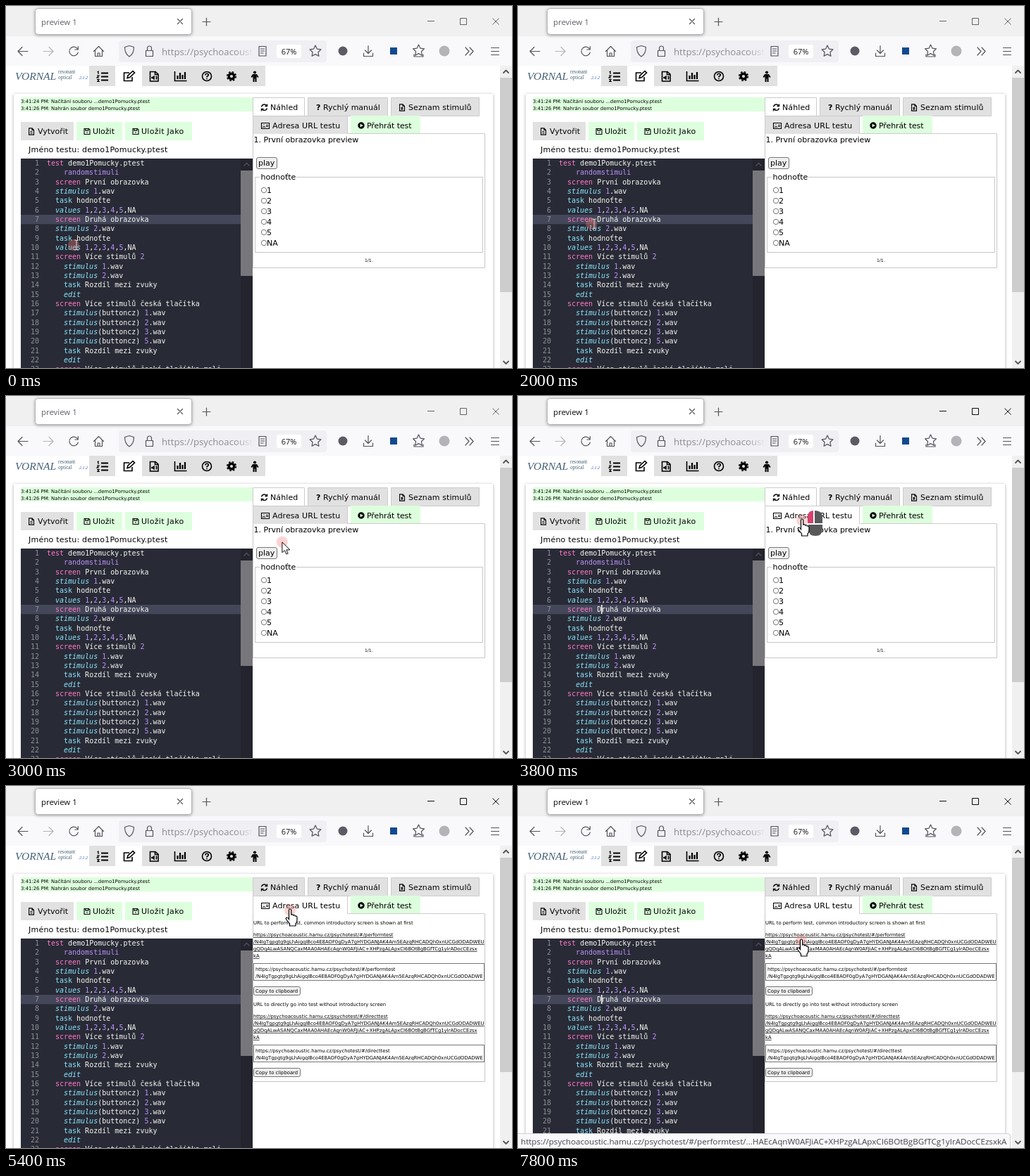
An HTML page that plays this animation: 718 px wide and 515 px high, repeating every 8 s.

```html
<!DOCTYPE html>
<html lang="cs">
<head>
<meta charset="utf-8">
<title>preview 1</title>
<style>
html, body { margin: 0; width: 100%; height: 100%; overflow: hidden; background: #fff; }
svg { display: block; }
text { white-space: pre; }
#stage { font: 11px "DejaVu Sans", sans-serif; }
.ui { font-family: "Open Sans", sans-serif; }
.log { font-size: 6.85px; }
.small { font-size: 6.83px; }
.link { text-decoration: underline; }
.logo { font-family: "Liberation Serif", serif; fill: #456276; }
.line { fill: none; stroke: #53535c; stroke-width: 1.2; stroke-linecap: round; stroke-linejoin: round; }
.ink { fill: none; stroke: #000; stroke-width: 1.6; }
.fine { stroke-width: 1.1; }
.grey { fill: #e1e1e1; }
.green { fill: #dfd; }
.tab { stroke: #ccc; }
.btn { fill: #efefef; stroke: #767676; }
.card { fill: #fff; filter: drop-shadow(0 1px 2px #0005); }
#code { font: 10px "DejaVu Sans Mono", monospace; fill: #f8f8f2; }
.num { fill: #909194; text-anchor: end; }
.k { fill: #ff79c6; }
.d { fill: #bd93f9; }
.c, .i { fill: #8be9fd; }
.i { font-style: italic; }

/* 8 s loop, hard switches */
.window, .home, .address, .preview, .urls, .focus, .click, .status { animation: 8s step-end infinite; }
.window { animation-name: window; }
.home { animation-name: home; }
.address { animation-name: address; }
.preview { animation-name: leave; }
.urls { animation-name: enter; }
.focus { animation-name: focus; }
.click { animation-name: click; }
.status { animation-name: status; }
.caret { animation: caret 1s step-end infinite; }
@keyframes window { 0% { color: #62626b; } 46.6%, 100% { color: #0c0c10; } }
@keyframes home { 0% { fill: #fff; } 58.3%, 100% { fill: #e1e1e1; } }
@keyframes address { 0% { fill: #e1e1e1; } 47.5%, 100% { fill: #fff; } }
@keyframes leave { 0% { opacity: 1; } 58.3%, 100% { opacity: 0; } }
@keyframes enter { 0% { opacity: 0; } 58.3%, 100% { opacity: 1; } }
@keyframes focus { 0% { opacity: 0; } 47.5%, 100% { opacity: 1; } }
@keyframes click { 0% { opacity: 0; } 46.6% { opacity: 1; } 57.5% { opacity: .75; } 58.3% { opacity: .5; } 59.1% { opacity: .25; } 60%, 100% { opacity: 0; } }
@keyframes status { 0% { opacity: 0; } 78.3% { opacity: .5; } 79.1% { opacity: .8; } 80%, 100% { opacity: 1; } }
@keyframes caret { 0% { opacity: 1; } 40% { opacity: 0; } 80%, 100% { opacity: 1; } }
</style>
</head>
<body>
<svg id="stage" width="718" height="515" viewBox="0 0 718 515">
  <defs>
    <linearGradient id="fade"><stop offset="0" stop-color="#f0f0f4" stop-opacity="0"/><stop offset="1" stop-color="#f0f0f4"/></linearGradient>
    <path id="star" d="M0-8 2.4-2.9 8-2.2 3.9 1.7 4.9 7.3 0 4.6-4.9 7.3-3.9 1.7-8-2.2-2.4-2.9Z"/>
    <path id="file" d="M-3.4-4.6H1L3.5-2V4.6H-3.4ZM1-4.6V-2H3.5M-1.6 0H1.6M-1.6 2.2H1.6"/>
    <path id="save" d="M-4-4H2.5L4-2.5V4H-4ZM-2.2-4V-1.4H1.8V-4M-1 1.5H1"/>
  </defs>

  <!-- browser -->
  <rect width="718" height="43" fill="#f0f0f0"/>
  <rect y="43" width="718" height="42" fill="#f9f9fb"/>
  <rect class="card" x="41.5" y="3.5" width="222" height="37" rx="4" stroke="#b4b4b8"/>
  <g class="window" stroke="currentColor" fill="none" stroke-width="1">
    <text class="ui" x="50" y="27" font-size="11.4" fill="currentColor" stroke="none">preview 1</text>
    <path d="M598 21.5H608M644.5 17.5H653.5V26.5H644.5ZM690.5 17.500 699.5 26.500M699.5 17.500 690.5 26.500"/>
  </g>
  <path class="line" d="M243.500 18.500 250.500 25.500M250.500 18.500 243.500 25.500M284.500 17V28M279 22.500H290"/>
  <g class="line">
    <path d="M31 64.500H17.500M23 58.500 17 64.500 23 70.500"/>
    <path stroke="#b5b5bb" d="M53 64.500H66.500M61 58.500 67 64.500 61 70.500"/>
    <path d="M101.500 61A6.300 6.300 0 1 0 102.300 66M102.300 57.500V62H97.800"/>
    <path d="M124.500 64.500 131.500 57.500 138.500 64.500M126.500 63V71.500H136.500V63M130 71V67H133V71"/>
  </g>
  <rect x="160" y="49" width="295" height="31" rx="4" fill="#f0f0f4"/>
  <g class="line">
    <path d="M175 56.500 181.500 58.500C181.500 66 179 69.500 175 72 171 69.500 168.500 66 168.500 58.500Z"/>
    <path d="M198.500 63.500H208.500V71.500H198.500ZM200.500 63V60A3 3 0 0 1 206.500 60V63"/>
    <path d="M359 57.500H369V71H359ZM361.500 61H366.500M361.500 64H366.500M361.500 67H365"/>
    <use href="#star" x="439" y="64"/>
  </g>
  <text class="ui" x="221" y="70" font-size="13.2" fill="#8a8a92">https://psychoacoust</text>
  <rect x="325" y="52" width="26" height="25" fill="url(#fade)"/>
  <rect x="384" y="55" width="35" height="19" rx="3" fill="#fff"/>
  <text class="ui" x="401.500" y="69" font-size="11" text-anchor="middle" fill="#15141a">67%</text>
  <circle cx="478" cy="64" r="6.500" fill="#5b5b66"/>
  <g class="line">
    <path d="M514 56.500V67M509.500 63 514 67.500 518.500 63M507.500 67V71.500H520.500V67"/>
    <use href="#star" x="585.500" y="63"/>
    <path d="M579 69V72H592V69M652 59 657 64.500 652 70M658 59 663 64.500 658 70M688.500 59.500H699.500M688.500 64.500H699.500M688.500 69.500H699.500"/>
  </g>
  <rect x="545" y="59" width="10" height="10" fill="#10498f"/>
  <circle cx="622" cy="64" r="7.500" fill="#b4b4b8"/>

  <!-- page header -->
  <rect y="85" width="701" height="430" fill="#fff"/>
  <g class="logo">
    <text x="13" y="105" font-size="15.500" font-style="italic">VORNAL</text>
    <text x="74" y="96" font-size="7.200">resonant</text>
    <text x="74" y="104" font-size="7.200">optical</text>
    <text x="104" y="104" font-size="6" font-style="italic" fill="#2a62a8">2.1.2</text>
  </g>
  <path class="grey" d="M118 85H155V114H118ZM193 85H368V114H193Z"/>
  <g class="ink">
    <path stroke-width="2" d="M135 95.500H145M135 100.500H145M135 105.500H145"/>
    <path stroke-width="1.200" d="M129.500 94 131 93V97M129 99H132L129 102H132M129 104.500H132L130.500 106 132 107.500H129"/>
    <path d="M175 95H167.500V106.500H179V101M172 102.500 173 99 180 92.500 182.500 95 175.500 101.500Z"/>
    <path d="M204.500 93.500H212L216 97V107H204.500ZM211.500 93.500V97.500H216M213 99.500Q214.500 102 213 104.500"/>
    <path d="M206.500 101H208L210.500 99V105L208 103H206.500Z" fill="#000" stroke-width=".5"/>
    <path d="M239.500 93V106.500H256.500"/>
    <path stroke-width="2.200" d="M243.500 104V99M247 104V95M250.500 104V98M254 104V94"/>
    <circle cx="285" cy="100" r="6.500"/>
    <path d="M282.800 98.500Q283 96.300 285 96.300 287.300 96.300 287.300 98.300 287 99.500 285 100.500V101.500M285 102.800V104.300"/>
    <circle cx="320" cy="100" r="3.800" style="stroke-width:3.400"/>
    <circle cx="320" cy="100" r="6.300" stroke-dasharray="2.600 2.348"/>
  </g>
  <path d="M350 97H356L358.500 101 357 102 355.500 100V108H353.500V103.500H352.500V108H350.500V100L349 102 347.500 101Z"/>
  <circle cx="353" cy="94.500" r="2.100"/>

  <!-- card -->
  <rect class="card" x="11" y="125" width="680" height="400"/>
  <rect class="green" x="21" y="130" width="329" height="20"/>
  <g class="log">
    <text x="21" y="138">3:41:24 PM: Načítání souboru ...demo1Pomucky.ptest</text>
    <text x="21" y="148">3:41:26 PM: Nahrán soubor demo1Pomucky.ptest</text>
  </g>
  <rect class="grey" x="21" y="165" width="75" height="26"/>
  <path class="green" d="M100 165H165V191H100ZM169 165H264V191H169Z"/>
  <g class="ink fine">
    <use href="#file" x="36" y="178.500"/><use href="#save" x="115" y="178.500"/><use href="#save" x="184" y="178.500"/>
  </g>
  <text x="45" y="182">Vytvořit</text>
  <text x="123" y="182">Uložit</text>
  <text x="192" y="182" letter-spacing=".3">Uložit Jako</text>
  <text x="32" y="208" letter-spacing=".22">Jméno testu: demo1Pomucky.ptest</text>

  <!-- editor -->
  <rect x="21" y="217" width="329" height="298" fill="#282a36"/>
  <rect x="21" y="297" width="312" height="13.300" fill="#44475a"/>
  <g id="code"></g>
  <g class="focus"><rect class="caret" x="118" y="297" width="1.500" height="13" fill="#f8f8f0"/></g>
  <rect x="333" y="217" width="17" height="298" fill="#23242d"/>
  <path class="line" d="M338 227 341.500 223.500 345 227"/>
  <rect id="thumb" x="333" y="234" width="17" height="150" fill="#77777b"/>

  <!-- tabs -->
  <g class="tab">
    <path class="home" d="M350.500 156.500V130.500H423.500V156.500"/>
    <path class="grey" d="M428.500 130.500H541.500V156.500H428.500ZM546.500 130.500H671.500V156.500H546.500Z"/>
  </g>
  <rect class="green" x="489" y="156" width="99" height="25"/>
  <path d="M350.500 181.500H679.500" stroke="#ccc"/>
  <path class="tab address" d="M350.500 182V156.500H484.500V182"/>
  <g class="ink fine">
    <path d="M362.500 143.500A4 4 0 0 1 369.500 141.500M370.500 139.500V142.500H367.500M370.500 145.500A4 4 0 0 1 363.500 147M362.500 149.500V146.500H365.500" stroke-width="1.400"/>
    <use href="#file" x="562" y="144.500"/>
    <path d="M362.500 166.500H373.500V174.500H362.500ZM369 169.500H372M369 171.500H372M364 173Q366 170.500 368 173M365.500 169H366.500"/>
  </g>
  <path d="M561 143.500 563 146 561 148Z"/>
  <circle cx="504" cy="170" r="4.700"/><path d="M502.500 167.500 507 170 502.500 172.500Z" fill="#dfd"/>
  <text x="375" y="148" letter-spacing=".1">Náhled</text>
  <text x="440" y="148" font-weight="bold">?</text>
  <text x="450" y="148">Rychlý manuál</text>
  <text x="571" y="148" letter-spacing=".1">Seznam stimulů</text>
  <text x="378" y="174" letter-spacing=".1">Adresa URL testu</text>
  <text x="512" y="174" letter-spacing="-.1">Přehrát test</text>

  <g class="preview">
    <path d="M350.500 182V372.500H679.500V182M353.500 243.500V350.500H676.500V243.500H412M360 243.500H353.500" fill="none" stroke="#c6c6c6"/>
    <text x="351.500" y="194">1. První obrazovka preview</text>
    <rect class="btn" x="355.500" y="215.500" width="29" height="16" rx="2.500"/>
    <text x="358" y="227">play</text>
    <text x="361.500" y="247">hodnoťte</text>
    <g id="radios"></g>
    <text x="509" y="364" font-size="6">1/1.</text>
  </g>
  <g class="urls"><path d="M350.500 182V420.500H679.500V182" fill="none" stroke="#c6c6c6"/><g id="urls" class="small"></g></g>

  <!-- page scrollbar -->
  <rect x="701" y="85" width="17" height="430" fill="#f0f0f0"/>
  <rect x="701" y="102" width="17" height="305" fill="#cdcdcd"/>
  <path class="line" style="stroke-width:1.800" d="M706 95 709.500 91.500 713 95M706 505.500 709.500 509 713 505.500"/>

  <g class="status">
    <path d="M-1 494.500H695Q698.500 494.500 698.500 498V516H-1Z" fill="#f9f9fb" stroke="#d0d0d4"/>
    <text class="ui" x="4" y="509.500" font-size="11.650" fill="#45454d">https://psychoacoustic.hamu.cz/psychotest/#/performtest/...HAEcAqnW0AFJiAC+XHPzgALApxCI6BOtBgBGfTCg1yIrADocCEzsxkA</text>
  </g>

  <g id="pointer">
    <circle r="8" fill="#f68078" fill-opacity=".35"/>
    <g class="click">
      <path d="M18 4V-14Q29-14 29-4V4Z" fill="#58595b"/>
      <path d="M16 4H8V-4Q8-14 16-14Z" fill="#d8416f"/>
      <path d="M9 6H29V12Q29 22 19 22 9 22 9 12Z" fill="#58595b"/>
    </g>
    <path id="beam" d="M1-7H3L4-6 5-7H7M4-6V6M1 7H3L4 6 5 7H7" fill="none" stroke="#ddd"/>
    <path id="arrow" d="M0 0V15L3.500 11.800 6 17.200 8.300 16.200 6 11H11Z" fill="#fff" stroke="#000"/>
    <path id="hand" d="M-1.500 0Q-1.500-2 0-2 1.700-2 1.700 0V6Q4 5 4.500 7 7 6 7.200 8 10 7.500 10 10V14Q10 17 8 19V22H-.500V19L-5.500 12.500Q-6.300 10.500-4.500 10-3 10-1.500 12.500Z" fill="#fff" stroke="#000" stroke-width="1.200"/>
  </g>
</svg>
<script>
const $ = id => document.getElementById(id);

const code = `test demo1Pomucky.ptest
    randomstimuli
  screen První obrazovka
  stimulus 1.wav
  task hodnoťte
  values 1,2,3,4,5,NA
  screen Druhá obrazovka
  stimulus 2.wav
  task hodnoťte
  values 1,2,3,4,5,NA
  screen Více stimulů 2
    stimulus 1.wav
    stimulus 2.wav
    task Rozdíl mezi zvuky
    edit
  screen Více stimulů česká tlačítka
    stimulus(buttoncz) 1.wav
    stimulus(buttoncz) 2.wav
    stimulus(buttoncz) 3.wav
    stimulus(buttoncz) 5.wav
    task Rozdíl mezi zvuky
    edit
  screen Více stimulů česká tlačítka malé`;
const kinds = { test: 'k', screen: 'k', randomstimuli: 'd', task: 'c' };
const span = (cls, s) => `<tspan class="${cls}">${s}</tspan>`;

$('code').innerHTML = code.split('\n').map((line, n) => {
  const [, indent, word, rest] = line.match(/^( *)(\w+)(.*)$/);
  const y = 227 + n * 40 / 3;
  return `<text class="num" x="47" y="${y}">${n + 1}</text>
    <text x="${58 + indent.length * 6}" y="${y}">${span(kinds[word] || 'i', word)}${rest.replace(/\b\d/g, d => span('d', d))}</text>`;
}).join('');

$('radios').innerHTML = ['1', '2', '3', '4', '5', 'NA'].map((label, n) =>
  `<circle cx="366" cy="${262 + n * 15}" r="3.700" fill="#fff" stroke="#767676"/>
   <text x="370" y="${266 + n * 15}">${label}</text>`).join('');

const key = '/N4IgTgpgtg9gLhAigqIBco4E8AOF0gDyA7gHYDGANJAK4Am5EAzqRHCADQh0xnUCGdODADWE';
const tail = 'gQDqALwASANQCaxMAA0AHAEcAqnW0AFJiAC+XHPzgALApxCI6BOtBgBGfTCg1yIrADocCEzsx';
const row = (x, y, s, cls = '') => `<text x="${x}" y="${y}" class="${cls}">${s}</text>`;
const urlBlock = (dy, title, page) => {
  const url = 'https://psychoacoustic.hamu.cz/psychotest/#/' + page;
  return `<g transform="translate(0 ${dy})">${row(351, 197, title)}
    ${[url, key + 'U', tail, 'kA'].map((s, n) => row(351, 214 + n * 10, s, 'link')).join('')}
    <rect x="351.500" y="252.500" width="327" height="24" fill="#fff" stroke="#767676"/>
    ${row(354, 263, url)}${row(354, 273, key)}
    <rect class="btn" x="351.500" y="285.500" width="66" height="12" rx="2"/>
    ${row(354, 294, 'Copy to clipboard')}</g>`;
};
$('urls').innerHTML =
  urlBlock(0, 'URL to perform test, common introductory screen is shown at first', 'performtest') +
  urlBlock(116, 'URL to directly go into test without introductory screen', 'directtest');

// start, end, x, y, vertical lag
const moves = [
  [133, 267, 97, 340, 1],
  [600, 1467, 100, 311, 1],
  [1533, 1667, 100, 310, 1],
  [1933, 2800, 388, 218, 1.8],
  [2800, 3400, 403, 177, 1],
  [5533, 6133, 402, 220, 1]
];

function place(t) {
  let x = 96, y = 340;
  for (const [from, to, toX, toY, lag] of moves) {
    const p = Math.min(1, Math.max(0, (t - from) / (to - from)));
    const e = (1 - Math.cos(p * Math.PI)) / 2;
    x += (toX - x) * e;
    y += (toY - y) * e ** lag;
  }
  return [x, y];
}

const TICK = 1000 / 15;
let start;
function draw(now) {
  start ??= now;
  const t = Math.floor(((now - start) % 8000 + 4) / TICK) * TICK;
  const [x, y] = place(t);
  const overLink = y < 182 || (t > 5500 && y > 207);
  const kind = x < 333 ? 'beam' : overLink ? 'hand' : 'arrow';
  for (const id of ['beam', 'hand', 'arrow']) $(id).style.display = id === kind ? '' : 'none';
  $('pointer').setAttribute('transform', `translate(${x.toFixed(1)} ${y.toFixed(1)})`);
  $('thumb').setAttribute('fill', x > 333 && x < 350 ? '#a0a0a4' : '#77777b');
  requestAnimationFrame(draw);
}
requestAnimationFrame(draw);
</script>
</body>
</html>
```
